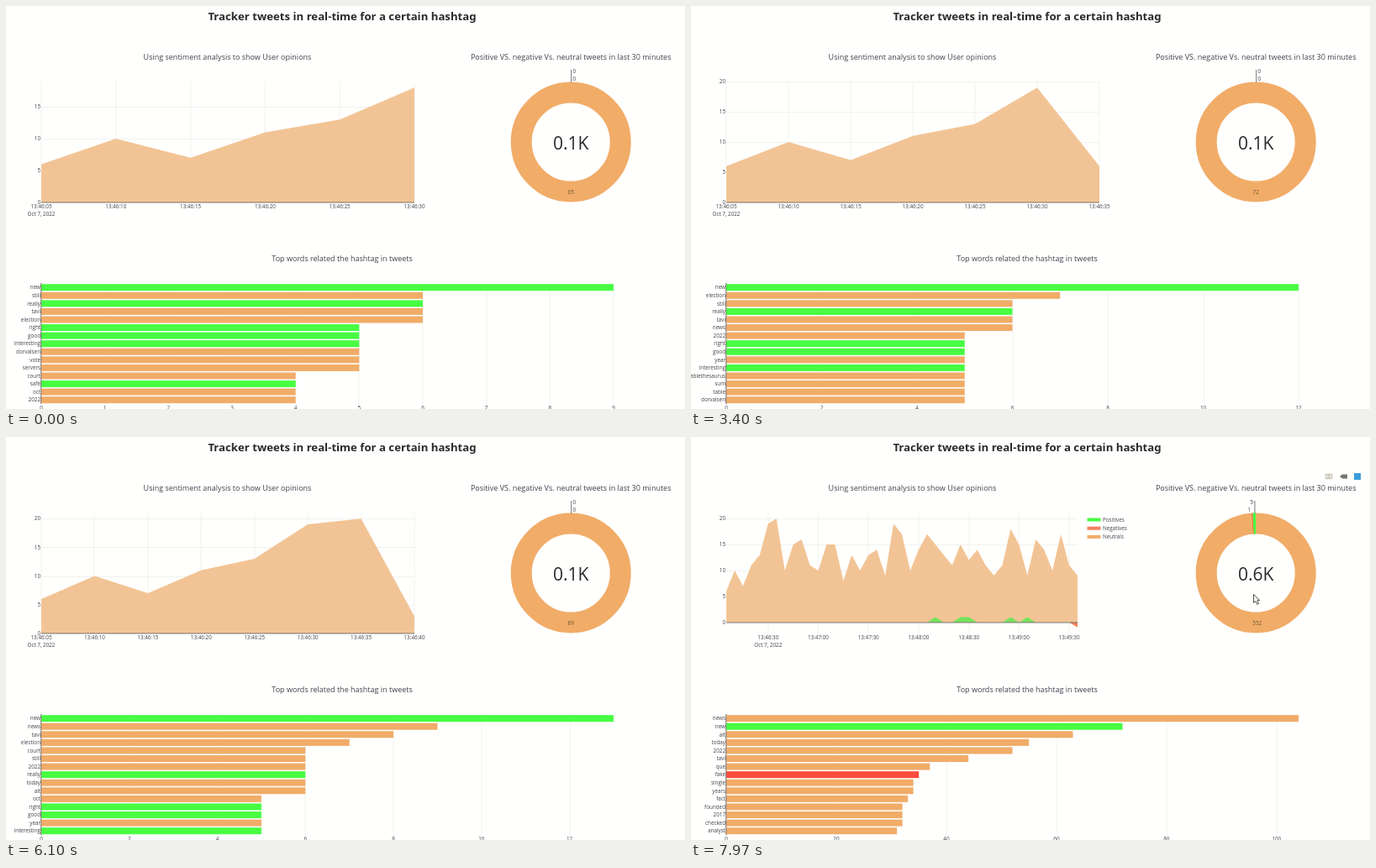
Recreate the animation shown at these times as an HTML page with a canvas. Size 808 by 480 pixels, loop 8 s.

```html
<!DOCTYPE html>
<html lang="en">
<head>
<meta charset="utf-8">
<title>Hashtag dashboard</title>
<style>
  html, body { margin: 0; width: 100%; height: 100%; overflow: hidden; background: #fffffd; }
  canvas { display: block; }
</style>
</head>
<body>
<canvas id="stage" width="808" height="480"></canvas>
<script>
const ctx = document.getElementById('stage').getContext('2d');
const LOOP = 8000;
const PAPER = '#fffffd', INK = '#40434e', GRID = '#f1f1f0', AXIS = '#77756f';
const ORANGE = '#f1ac68', PEACH = '#f2c495', GREEN = '#48fd42', LEAF = '#74e25a', RED = '#ff4b3e', CORAL = '#f5805f';

// Tweets per five seconds, starting at 13:46:05.
const neutrals = [6, 10, 7, 11, 13, 19, 20, 10, 15, 16, 11, 10, 15, 15, 8, 13, 10, 13, 14, 9, 19, 17,
  10, 14, 17, 15, 13, 11, 15, 12, 14, 11, 9, 11, 18, 15, 9, 16, 14, 10, 17, 11, 9];
const positiveAt = [25, 28, 29, 34, 36], negativeAt = [42];

const parseRanking = text => text.split('|').flatMap(group => {
  const [count, ...words] = group.split(' ');
  return words.map(word => [word, +count]);
});
const rankings = [
  '9 new|6 still really tavi election|5 right good interesting dorvalsen vote servers|4 court safe oct 2022',
  '11 new|7 election|6 still really tavi news|5 2022 right good year interesting dorvalsen vote servers poll',
  '12 new|7 election|6 still really tavi news|5 2022 right good year interesting tablethesaurus sum table dorvalsen',
  '13 new|9 news|8 tavi|7 election|6 court still 2022 really today alt|5 oct right good year interesting',
  '53 new news|34 today|32 tavi alt|27 analyst|26 2022|25 election|21 que brenvik|20 analysis table poll|19 oct people',
  '104 news|72 new|63 alt|55 today|52 2022|44 tavi|37 que|35 fake|34 single years|33 fact|32 founded 2017 checked|31 analyst'
].map(parseRanking);
const wordColors = { fake: RED };
for (const word of ['new', 'really', 'right', 'good', 'interesting', 'safe']) wordColors[word] = GREEN;

const lerp = (a, b, p) => a + (b - a) * p;
const curve = (a, b, c, p) => lerp(lerp(a, b, p), lerp(b, c, p), p);
const stepped = (t, from, to, steps) =>
  Math.min(1, Math.max(0, Math.floor((t - from) / (to - from) * steps) / steps));
const sum = list => list.reduce((a, b) => a + b, 0);

// Time-lapse progress: up to the hovered moment, then a faster run to the end.
const lapse = t => stepped(t, 6240, 7200, 29);
const finish = t => stepped(t, 7200, 7330, 4);

function text(str, x, y, { size = 6.3, align = 'center', color = INK, family = 'Open Sans', weight = 400 } = {}) {
  ctx.font = `${weight} ${size}px "${family}", sans-serif`;
  ctx.textAlign = align;
  ctx.textBaseline = 'alphabetic';
  ctx.fillStyle = color;
  ctx.fillText(str, x, y + size * 0.36);
}
function rect(x, y, w, h, color) {
  ctx.fillStyle = color;
  ctx.fillRect(x, y, w, h);
}
function polygon(points, fill, stroke) {
  ctx.beginPath();
  points.forEach(([x, y]) => ctx.lineTo(x, y));
  ctx.closePath();
  ctx.fillStyle = fill;
  ctx.fill();
  if (stroke) { ctx.strokeStyle = stroke; ctx.lineWidth = 1; ctx.stroke(); }
}

function mixRankings(a, b, p) {
  if (p === 0) return a;
  const before = new Map(a), after = new Map(b);
  const startFloor = a[14][1] - 1, endFloor = b[14][1] - 1;
  return [...new Set([...after.keys(), ...before.keys()])]
    .map(word => [word, Math.round(lerp(before.get(word) ?? startFloor, after.get(word) ?? endFloor, p))])
    .sort((m, n) => n[1] - m[1])
    .slice(0, 15);
}
function rankingAt(t) {
  if (t < 1430) return rankings[0];
  if (t < 3400) return rankings[1];
  if (t < 5500) return rankings[2];
  if (t < 7230) return mixRankings(rankings[3], rankings[4], lapse(t));
  return mixRankings(rankings[4], rankings[5], finish(t));
}

// The newest bin is still filling, so its count can be below the final one.
function seriesAt(t) {
  let count, latest;
  if (t < 1470) [count, latest] = [6, 18];
  else if (t < 5540) [count, latest] = [7, t < 3430 ? 6 : 17];
  else if (t < 6270) [count, latest] = [8, 3];
  else count = Math.round(t < 7230 ? lerp(8, 32, lapse(t)) : lerp(32, 43, finish(t)));
  if (count === 32) latest = 8;
  const neutral = neutrals.slice(0, count);
  if (latest) neutral[count - 1] = latest;
  const marks = (list, value) => neutral.map((_, i) => list.includes(i) ? value : 0);
  return { neutral, positive: marks(positiveAt, 1), negative: marks(negativeAt, -1) };
}

function drawArea({ neutral, positive, negative }) {
  const hasPositive = positive.includes(1), hasNegative = negative.includes(-1);
  const left = 42, right = hasNegative ? 460 : hasPositive ? 463 : 486;
  const top = Math.max(...neutral);
  const unit = hasNegative ? 129.6 / (top + 1) : 136.8 / top;
  const zero = hasNegative ? 226.8 - unit : 234;
  const span = (neutral.length - 1) * 5;
  const px = seconds => left + seconds / span * (right - left);
  const py = value => zero - value * unit;

  const interval = [5, 10, 15, 30].find(d => span / d <= 7);
  const first = Math.ceil(5 / interval) * interval;
  const ticks = [];
  for (let s = first; s <= span + 5; s += interval) ticks.push(s);
  for (const s of ticks) rect(Math.round(px(s - 5)) - 0.5, 90, 1, 144, GRID);
  for (let v = 5; py(v) >= 90; v += 5) rect(left, Math.round(py(v)), right - left, 1, GRID);

  const fillSeries = (values, color) =>
    polygon([[left, zero], ...values.map((v, i) => [px(i * 5), py(v)]), [right, zero]], color);
  fillSeries(neutral, PEACH);
  if (hasNegative) fillSeries(negative, CORAL);
  if (hasPositive) fillSeries(positive, LEAF);
  rect(left, Math.round(zero) - 0.5, right - left, 1, AXIS);

  for (let v = 0; py(v) >= 90; v += 5) text(v, 41, py(v), { align: 'right' });
  const pad = n => String(n).padStart(2, '0');
  for (const s of ticks) text(`13:${pad(46 + Math.floor(s / 60))}:${pad(s % 60)}`, px(s - 5), 239);
  text('Oct 7, 2022', px(first - 5), 247.5);

  if (!hasPositive) return;
  const legend = [['Positives', GREEN], ...(hasNegative ? [['Negatives', CORAL]] : []), ['Neutrals', ORANGE]];
  legend.forEach(([name, color], i) => {
    rect(right + 11.5, 96.5 + i * 10.2, 16, 4, color);
    text(name, right + 30, 98.5 + i * 10.2, { align: 'left' });
  });
}

function drawDonut({ neutral, positive, negative }) {
  const cx = 672.2, cy = 162;
  const counts = [sum(neutral), sum(positive), -sum(negative)];
  const total = sum(counts);
  const arc = (from, to, color) => {
    const turn = a => (a - 0.25) * Math.PI * 2;
    ctx.beginPath();
    ctx.arc(cx, cy, 59, turn(from), turn(to));
    ctx.lineWidth = 25;
    ctx.strokeStyle = color;
    ctx.stroke();
  };
  const green = counts[1] / total, red = counts[2] / total;
  arc(0, 1, ORANGE);
  if (green) arc(-green, 0, GREEN);
  if (red) arc(-green - red, -green, RED);

  const offset = green ? -1.8 : 0;
  rect(cx + offset, 76, 1, 15, AXIS);
  text(counts[1], cx + (green ? -5 : 4), 78);
  text(counts[2], cx + (green ? -8 : 4), 86.5);
  text(counts[0], cx + (green ? 1.5 : 0), 221.5, { color: '#6b5530' });
  text((total / 1000).toFixed(1) + 'K', cx, 163, { size: 21, color: '#2b2b2b' });
}

function drawBars(ranking) {
  const left = 42, max = ranking[0][1], unit = 681 / max;
  const step = [1, 2, 5, 10, 20].find(s => max / s <= 9);
  for (let v = 0; v <= max; v += step) {
    const x = left + v * unit;
    if (v) rect(Math.round(x) - 0.5, 330, 1, 144, GRID);
    text(v, x, 478.5);
  }
  ranking.forEach(([word, count], i) => {
    const y = 335.2 + i * 9.57;
    rect(left, y - 4, count * unit, 8, wordColors[word] || ORANGE);
    text(word, 41, y, { align: 'right' });
  });
  rect(41.2, 330, 1, 144, AXIS);
}

function drawAreaToolbar() {
  const icons = [378, 394, 407, 424, 436, 448, 462, 478, 492, 504];
  icons.forEach((x, i) => {
    const color = i === 1 || i === 9 ? '#5c5c5c' : '#c6c6c2';
    ctx.strokeStyle = color;
    ctx.lineWidth = 1.4;
    ctx.beginPath();
    if (i === 1) {
      ctx.arc(x - 0.5, 46, 2.6, 0, 7);
      ctx.moveTo(x + 1.5, 48);
      ctx.lineTo(x + 4, 50.5);
    } else if (i === 2) {
      ctx.moveTo(x - 4, 47); ctx.lineTo(x + 4, 47);
      ctx.moveTo(x, 43); ctx.lineTo(x, 51);
    } else if (i === 7) {
      ctx.moveTo(x - 2, 44); ctx.lineTo(x + 2, 44); ctx.lineTo(x + 2, 48);
    } else if (i > 7) {
      rect(x - 4, 44.5, 8, 5, color);
    } else {
      ctx.rect(x - 3, 44, 6, 6);
      ctx.moveTo(x - 2, 47); ctx.lineTo(x + 2, 47);
    }
    ctx.stroke();
  });
  rect(517, 43, 8, 8, '#3aa0dc');
}

function drawDonutToolbar() {
  ctx.strokeStyle = '#c9c6b4';
  ctx.lineWidth = 1.4;
  ctx.strokeRect(755.5, 44.5, 7, 5);
  ctx.beginPath();
  ctx.arc(759, 47, 1.3, 0, 7);
  ctx.stroke();
  polygon([[772, 47], [775, 44.5], [781, 44.5], [781, 49.5], [775, 49.5]], '#77776f');
  rect(789, 43, 8, 8, '#3aa0dc');
}

function drawHover() {
  const tag = (y, value, color) => {
    polygon([[422, y], [426, y - 3], [426, y - 6], [437, y - 6], [437, y + 6], [426, y + 6], [426, y + 3]], color, '#5a4720');
    text(value, 431.5, y, { size: 6.8 });
  };
  tag(131.5, 15, '#e5964a');
  text('Neutrals', 438.5, 131.5, { size: 6.8, align: 'left', color: '#e8984f' });
  rect(433, 221, 31, 12, PAPER);
  tag(227, 1, '#43c63c');
  text('Positives', 434.5, 227, { size: 6.8, align: 'left', color: '#3fe03a' });
  rect(428, 219, 1, 16, '#222');
  rect(420, 226.5, 16, 1, '#222');
  polygon([[389, 238], [419, 238], [422, 235], [425, 238], [457, 238], [457, 248], [389, 248]], '#333330');
  text('Oct 7, 2022, 13:48:25', 423, 243, { size: 6.7, color: '#fff' });
}

function drawPointer(x, y) {
  polygon([[0, 0], [0, 10], [2.4, 8], [4.2, 12], [6, 11], [4.3, 7.3], [7.2, 7]].map(([dx, dy]) => [x + dx, y + dy]),
    '#fffffa', '#4d4d48');
}

function draw(t) {
  rect(0, 0, 808, 480, PAPER);
  text('Tracker tweets in real-time for a certain hashtag', 400, 12,
    { size: 13.2, weight: 600, family: 'Noto Sans', color: '#2a2a2a' });
  text('Using sentiment analysis to show User opinions', 263.5, 60.5, { size: 9 });
  text('Positive VS. negative Vs. neutral tweets in last 30 minutes', 672.2, 60.5, { size: 9 });
  text('Top words related the hashtag in tweets', 400, 300.5, { size: 9 });

  const series = seriesAt(t);
  drawArea(series);
  drawDonut(series);
  drawBars(rankingAt(t));

  if (t >= 6900 && t < 7300) drawAreaToolbar();
  if (t >= 7130 && t < 7260) drawHover();
  if ((t >= 6600 && t < 6900) || t >= 7710) drawDonutToolbar();
  if (t >= 7530) {
    const p = stepped(t, 7630, 7970, 8);
    drawPointer(curve(782, 820, 669.5, p), curve(246, 285, 187.5, p));
  }
}

function tick() {
  draw(performance.now() % LOOP);
  requestAnimationFrame(tick);
}
tick();
</script>
</body>
</html>
```
